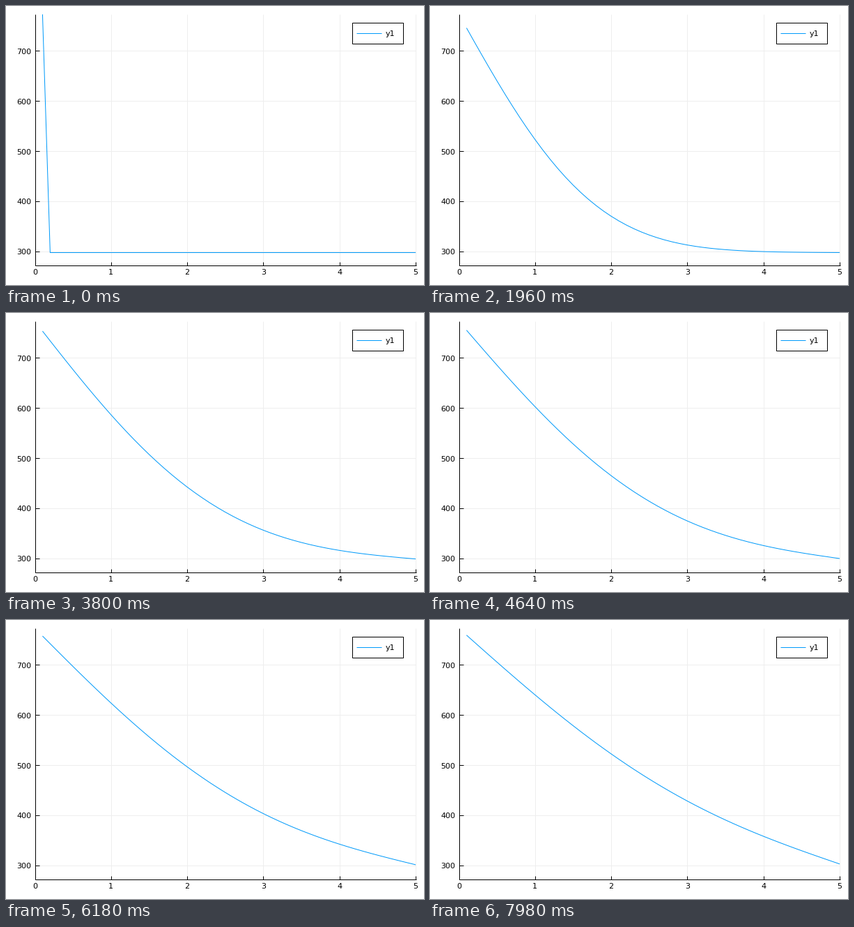
Write a matplotlib script that moves like this. It is 600 px wide and 400 px high and loops after 8 s.

```python
import numpy as np
import matplotlib.pyplot as plt
from matplotlib.animation import FuncAnimation
from matplotlib.patches import Rectangle

W, H, DPI = 600, 400, 100
LEFT, RIGHT, TOP, BOTTOM = 41.5, 588, 12, 371.5
HOT, COLD = 773.0, 298.0
Y_MIN, Y_MAX = 273, 773
BLUE = "#009afa"
PX = 72 / DPI  # one pixel in points

# Rod heated at x = 0: explicit heat equation on 50 inner nodes
NODES, DX, DIFFUSIVITY, DT, SUBSTEPS = 50, 0.1, 0.23, 0.01, 10
STATES = 172


def px(x):
    return LEFT + x * (RIGHT - LEFT) / 5


def py(y):
    return BOTTOM - (y - Y_MIN) * (BOTTOM - TOP) / (Y_MAX - Y_MIN)


def solve():
    u = np.full(NODES + 2, COLD)
    u[:2] = HOT
    r = DIFFUSIVITY * DT / DX**2
    states = [u[1:-1].copy()]
    for _ in range(STATES - 1):
        for _ in range(SUBSTEPS):
            u[1:-1] += r * (u[2:] - 2 * u[1:-1] + u[:-2])
        states.append(u[1:-1].copy())
    return states


fig = plt.figure(figsize=(W / DPI, H / DPI), dpi=DPI, facecolor="white")
ax = fig.add_axes([0, 0, 1, 1])
ax.set_xlim(0, W)
ax.set_ylim(H, 0)
ax.axis("off")


def line(x0, y0, x1, y1, color="black", z=3):
    ax.plot([x0, x1], [y0, y1], color=color, lw=PX, zorder=z,
            solid_capstyle="butt")


def label(x, y, s, ha):
    ax.text(x, y, s, ha=ha, va="baseline", fontsize=8,
            family="DejaVu Sans", color="black", zorder=6)


for v in range(6):
    x = px(v)
    line(x, TOP, x, BOTTOM, "#eeeeee", 1)
    line(x, BOTTOM, x, BOTTOM - 5)
    label(x, 385, str(v), "center")

for v in range(300, 701, 100):
    y = py(v)
    line(LEFT, y, RIGHT, y, "#eeeeee", 1)
    line(LEFT, y, LEFT + 6.5, y)
    label(36.3, y + 4.3, str(v), "right")

line(LEFT, TOP, LEFT, BOTTOM + 0.5)
line(LEFT, BOTTOM, RIGHT + 0.5, BOTTOM)

ax.add_patch(Rectangle((496.5, 23.5), 73.5, 30.5, fc="white", ec="black",
                       lw=PX, zorder=4))
line(502.5, 39, 539, 39, BLUE, 5)
label(544.7, 43.3, "y1", "left")

states = solve()
xs = px(DX * np.arange(1, NODES + 1))
curve, = ax.plot(xs, py(states[0]), color=BLUE, lw=PX, zorder=2,
                 solid_capstyle="butt")
curve.set_clip_path(Rectangle((LEFT, TOP - 0.5), RIGHT - LEFT, BOTTOM - TOP,
                              transform=ax.transData))


def update(i):
    # states last 20, 100 and 20 ms in turn
    group, tick = divmod(i, 7)
    k = 3 * group + (tick > 0) + (tick > 5)
    curve.set_ydata(py(states[k]))
    return curve,


anim = FuncAnimation(fig, update, frames=400, interval=20, repeat=True,
                     repeat_delay=0, blit=False)
plt.show()
```
